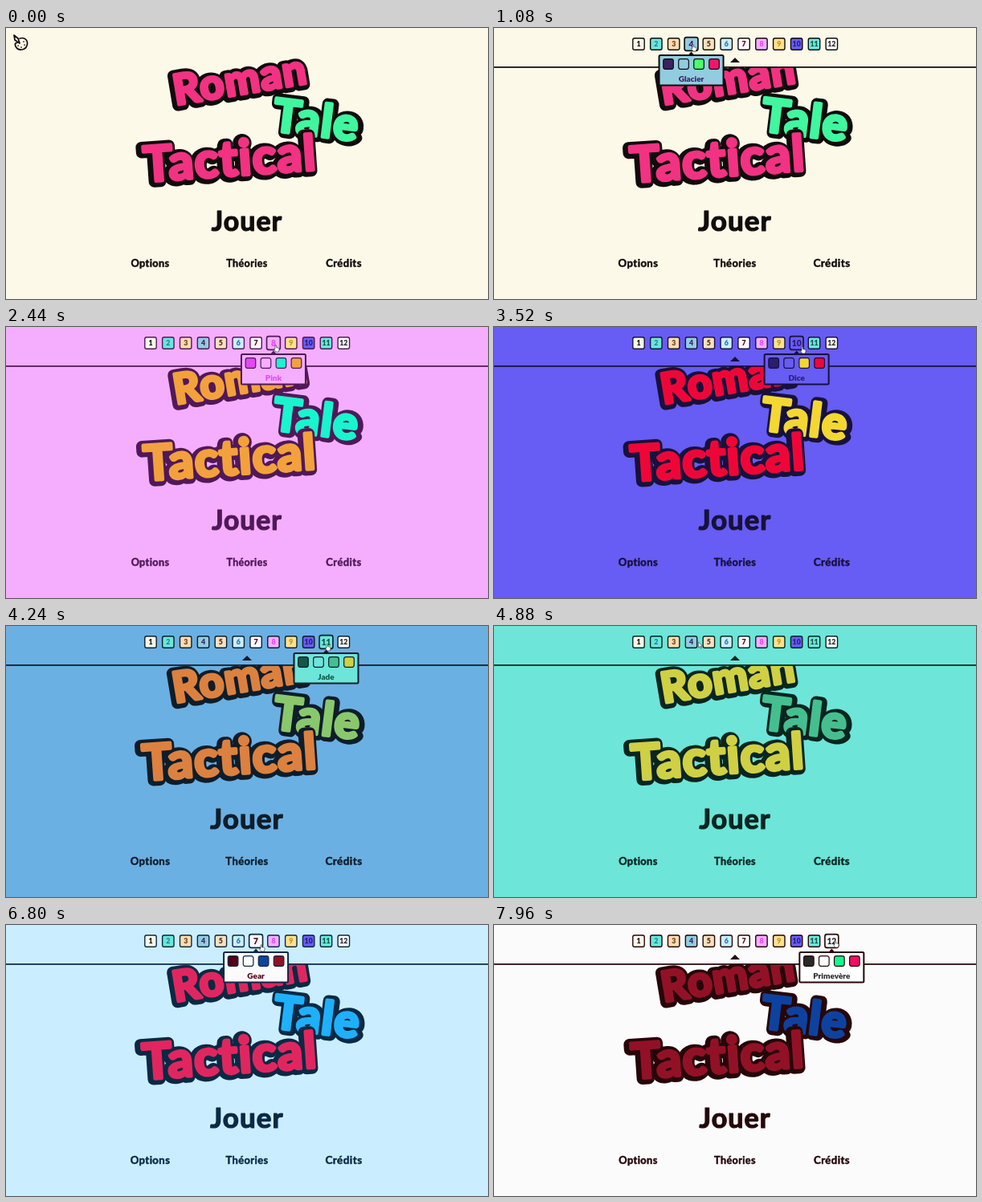
Animation, 600 px wide and 338 px high, one loop 8000 ms. Source, as an HTML page:

```html
<!DOCTYPE html>
<html lang="fr">
<head>
<meta charset="utf-8">
<title>Menu</title>
<style>
  html, body { margin: 0; width: 100%; height: 100%; overflow: hidden; }
  svg { display: block; width: 100vw; height: 100vh; background: var(--bg);
    font-family: Lato, "Open Sans", sans-serif; font-weight: 700; user-select: none; }
  text { stroke-linejoin: round; stroke-linecap: round; }
  #logo { letter-spacing: 1.6px; }
  .outline { fill: var(--ink); stroke: var(--ink); stroke-width: 14; }
  .face { stroke-width: 4.4; }
  .title { fill: var(--title); stroke: var(--title); }
  .tool { fill: var(--tool); stroke: var(--tool); }
  .menu { fill: var(--ink); stroke: var(--ink); stroke-width: .035em; letter-spacing: .03em; text-anchor: middle; }
  .line { stroke: var(--ink); }
  .solid { fill: var(--ink); }
  .small { text-anchor: middle; font-weight: 900; }
</style>
</head>
<body>
<svg id="stage" viewBox="0 0 600 338">
  <g id="logo"></g>
  <g id="menu"></g>
  <g class="line" fill="none" stroke-width="1.7" stroke-linecap="round" stroke-linejoin="round">
    <path d="M17 13C24 11 28 16 26 22C24 28 15 29 12 23C10 19 13 18 16 18"/>
    <path d="M10 9L11 15L17 19L15 13Z"/>
    <path d="M22 17h.1M23 21h.1M19 24h.1M15 22h.1"/>
  </g>
  <g id="panel">
    <rect y="-60" width="600" height="109" fill="var(--bg)"/>
    <path class="line" d="M0 48.8H600" stroke-width="1.7"/>
    <path class="solid" d="M294 43L300 37L306 43Z"/>
    <g id="buttons"></g>
    <g id="tip">
      <path class="solid" d="M-4 34L0 29.5L4 34Z"/>
      <rect class="line" id="tipBox" x="-40" y="34" width="80" height="37.5" rx="1.5" stroke-width="2"/>
      <g id="swatches"></g>
      <text class="small" id="tipName" y="66.5" font-size="10"></text>
    </g>
  </g>
  <g id="cursor" fill="#fff" stroke="#222" stroke-width=".6" stroke-linejoin="round">
    <path id="arrow" d="M0 0V7L1.8 5.4L3 8L4.2 7.4L3 5H5Z"/>
    <path id="hand" d="M0 0Q1-1 1.6 0V2.6L4.6 3.2Q5.4 4 5 5.5L4.3 8H.8L-1.4 5Q-1.4 3.8 0 4.4Z"/>
  </g>
</svg>
<script>
const LOOP = 8000;
const NS = "http://www.w3.org/2000/svg";
const $ = id => document.getElementById(id);

// name, background, swatch ink, tool, title, page ink
const themes = [
  ["Crème", "#fdf9e8", "#151515", "#40f79f", "#f23282", "#100c0c"],
  ["Lagune", "#6de5d9", "#168da0", "#fff08a", "#f05a78", "#0a3540"],
  ["Sable", "#fbdcb0", "#7a3a18", "#f2a03c", "#c83c32", "#401c0a"],
  ["Glacier", "#91cce0", "#3c2160", "#4bff6b", "#f5146a", "#211238"],
  ["Pêche", "#fbe0bd", "#4a2c1e", "#68b878", "#e86b42", "#2e1810"],
  ["Neige", "#caeeff", "#2470ac", "#1fb0fb", "#e1265f", "#0b2944"],
  ["Gear", "#fcfbfc", "#540015", "#0e429f", "#921126", "#260609"],
  ["Pink", "#f4aefd", "#e348f3", "#19f5ce", "#f3a13c", "#501858"],
  ["Miel", "#ffe18d", "#c79428", "#f5a52a", "#c95230", "#4d3308"],
  ["Dice", "#675cf3", "#291e70", "#f4d733", "#ef0638", "#17113c"],
  ["Jade", "#6de5d9", "#125849", "#45bf90", "#d0d044", "#09251f"],
  ["Primevère", "#ffffff", "#292929", "#19f58d", "#f30c62", "#161616"]
];
const clicks = [[0, 0], [1240, 3], [2260, 7], [3410, 9], [4180, 10], [6520, 5], [6970, 6]];
const cursorPath = [
  [0, 17, 19], [240, 17, 19], [880, 243, 23], [1080, 247, 21], [1350, 247, 23],
  [2160, 333, 24], [2440, 335, 23], [2850, 336, 24], [3340, 379, 25], [3520, 383, 25],
  [3800, 383, 25], [4100, 399, 23], [4380, 399, 23], [4880, 254.4, 20],
  [5300, 204, 22], [5700, 226, 21], [6360, 288, 23], [6580, 290, 23],
  [6800, 317, 25], [7100, 315, 24], [7700, 400, 23], [7960, 424, 20], [8000, 424, 20]
];

function add(parent, tag, attrs, content = "") {
  const node = document.createElementNS(NS, tag);
  for (const key in attrs) node.setAttribute(key, attrs[key]);
  node.textContent = content;
  return parent.appendChild(node);
}

function addWord(word, x, y, angle, size, kind, dx, dy) {
  const g = add($("logo"), "g", { transform: `translate(${x} ${y}) rotate(${angle})`, "font-size": size });
  add(g, "text", { class: "outline", x: dx, y: dy }, word);
  add(g, "text", { class: "face " + kind }, word);
}
addWord("Roman", 211, 96, -9.5, 52, "title", -1.5, 1);
addWord("Tale", 331, 128, 7, 57, "tool", 2, .5);
addWord("Tactical", 172, 192, -4, 61, "title", -2, 1);

const menu = [["Jouer", 300, 253, 34], ["Options", 179.5, 298, 12.8], ["Théories", 300, 298, 12.6], ["Crédits", 420.5, 298, 13.2]]
  .map(([word, x, y, size]) => ({ x, y: y - size * .35,
    node: add($("menu"), "text", { class: "menu", x, y, "font-size": size }, word) }));

const buttonX = i => 180 + 21.85 * i;
const buttons = themes.map(([, bg, ink], i) => {
  const g = add($("buttons"), "g", {});
  add(g, "rect", { class: "line", x: -7.2, y: -7.2, width: 14.4, height: 14.4, rx: 2.2, fill: bg, "stroke-width": 1.4 });
  add(g, "text", { class: "small", y: 3.2, "font-size": 8.8, fill: ink }, i + 1);
  return g;
});
const swatches = [-28.5, -9.5, 9.5, 28.5].map(x =>
  add($("swatches"), "rect", { class: "line", x: x - 6.3, y: 38.7, width: 12.6, height: 12.6, rx: 2.5, "stroke-width": 1.2 }));

const clamp = v => Math.max(0, Math.min(1, v));
const smooth = v => v * v * (3 - 2 * v);
const channels = hex => [1, 3, 5].map(i => parseInt(hex.slice(i, i + 2), 16));

function mix(a, b, k) {
  const to = channels(b);
  return `rgb(${channels(a).map((v, i) => Math.round(v + (to[i] - v) * k))})`;
}

function cursorAt(t) {
  const i = cursorPath.findIndex(p => p[0] > t);
  const [t0, x0, y0] = cursorPath[i - 1], [t1, x1, y1] = cursorPath[i];
  const k = smooth((t - t0) / (t1 - t0));
  return [x0 + (x1 - x0) * k, y0 + (y1 - y0) * k];
}

function paintTheme(t) {
  const n = clicks.filter(c => c[0] <= t).length - 1;
  const now = themes[clicks[n][1]], before = themes[clicks[Math.max(0, n - 1)][1]];
  const k = clamp((t - clicks[n][0]) / 100);
  [["--bg", 1], ["--tool", 3], ["--title", 4], ["--ink", 5]].forEach(([name, i]) =>
    $("stage").style.setProperty(name, mix(before[i], now[i], k)));
}

function paintHover(hover) {
  buttons.forEach((g, i) => g.setAttribute("transform",
    `translate(${buttonX(i)} 20) scale(${i === hover ? 1.17 : 1})`));
  $("tip").style.display = hover < 0 ? "none" : "";
  if (hover < 0) return;
  const [name, bg, ink, tool, title] = themes[hover];
  $("tip").setAttribute("transform", `translate(${buttonX(hover)} 0)`);
  $("tipBox").setAttribute("fill", bg);
  $("tipName").setAttribute("fill", ink);
  $("tipName").textContent = name;
  [ink, bg, tool, title].forEach((c, i) => swatches[i].setAttribute("fill", c));
}

function draw(t) {
  paintTheme(t);
  const wave = Math.cos((t - 1050) / 3000 * 2 * Math.PI);
  const pulse = (x, y, s) => `translate(${x} ${y}) scale(${s}) translate(${-x} ${-y})`;
  $("logo").setAttribute("transform", pulse(300, 119, 1 + .007 * wave));
  menu.forEach(({ node, x, y }) => node.setAttribute("transform", pulse(x, y, 1.01 + .022 * wave)));

  const open = smooth(clamp((t - 260) / 440));
  $("panel").setAttribute("transform", `translate(0 ${-54 * (1 - open)})`);

  const [x, y] = cursorAt(t);
  const hover = open < 1 ? -1 : themes.findIndex((_, i) => Math.abs(x - buttonX(i)) < 8.5 && Math.abs(y - 20) < 9);
  paintHover(hover);
  $("cursor").setAttribute("transform", `translate(${x} ${y})`);
  $("cursor").style.display = t < 40 ? "none" : "";
  $("arrow").style.display = hover < 0 ? "" : "none";
  $("hand").style.display = hover < 0 ? "none" : "";
}

const start = performance.now();
function tick() {
  draw((performance.now() - start) % LOOP);
  requestAnimationFrame(tick);
}
tick();
</script>
</body>
</html>
```
